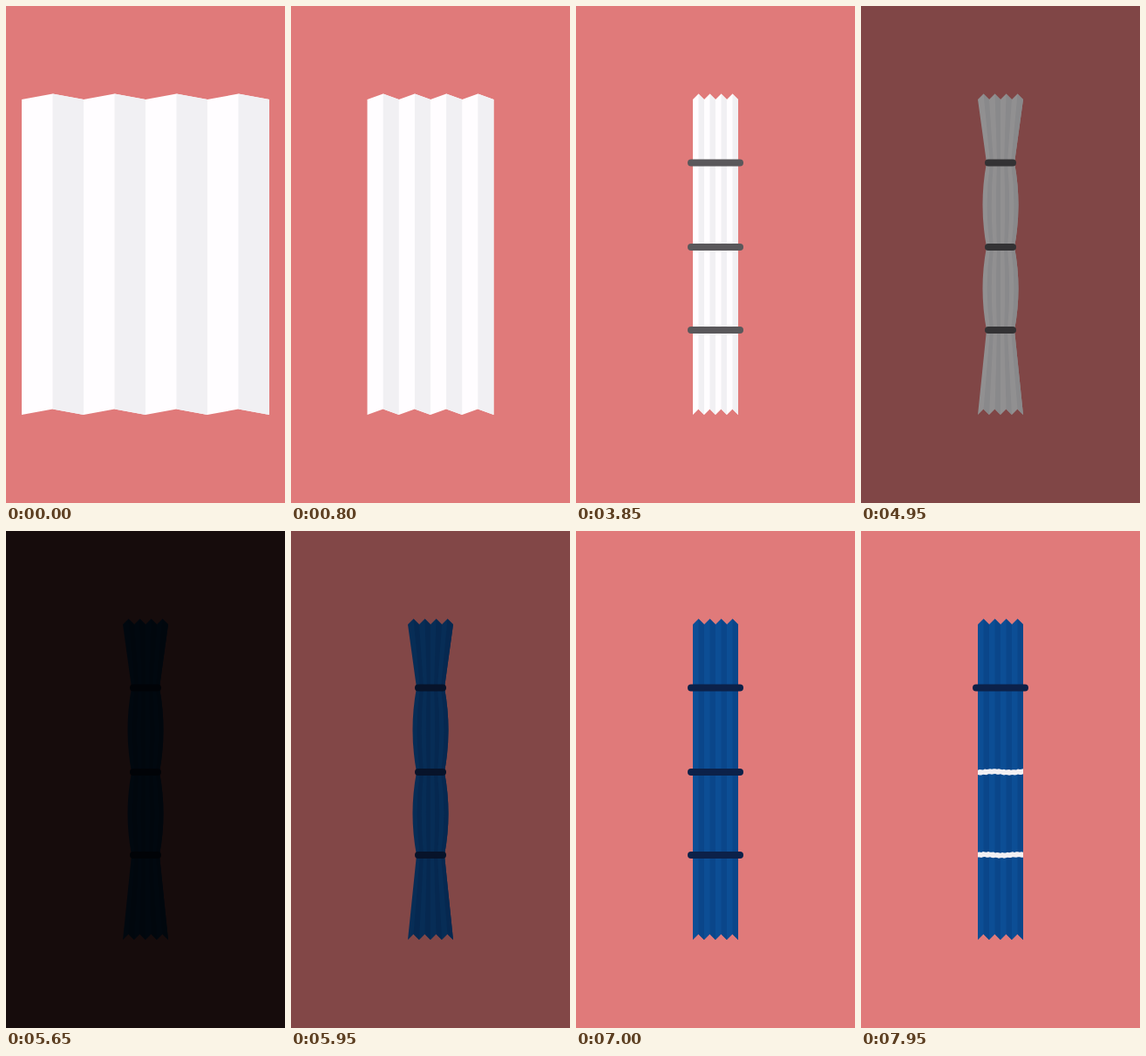
An HTML page that plays this animation: 320x569 px, repeating every 8000 ms.

```html
<!DOCTYPE html>
<html lang="en">
<head>
<meta charset="utf-8">
<title>Folded, tied and dyed cloth</title>
<style>
  html, body { margin: 0; width: 100%; height: 100%; overflow: hidden; background: #e07a7a; }
  svg { display: block; width: 100vw; height: 100vh; }
</style>
</head>
<body>
<svg id="stage" viewBox="0 0 320 569"></svg>
<script>
const LOOP = 8000;
const CX = 160, TOP = 107, BOTTOM = 468, FOLD = 6.5, PANELS = 8;
const TIES = [179.5, 276, 371];
const WHITE = { light: '#fffdff', shade: '#f1f0f3', band: '#5a585b' };
const BLUE = { light: '#0c4e95', shade: '#0a468a', band: '#0c2149' };

const stage = document.getElementById('stage');

function add(tag, attrs) {
  const el = document.createElementNS('http://www.w3.org/2000/svg', tag);
  set(el, attrs);
  stage.append(el);
  return el;
}
function set(el, attrs) {
  for (const key in attrs) el.setAttribute(key, attrs[key]);
}
const ramp = (t, a, b) => Math.min(1, Math.max(0, (t - a) / (b - a)));
const ease = p => p < 0.5 ? 2 * p * p : 1 - 2 * (1 - p) * (1 - p);
const move = (t, a, b) => ease(ramp(t, a, b));
const pt = (x, y) => x.toFixed(2) + ' ' + y.toFixed(2);

// Rough white line left where a tie kept the dye out
function resist(y, seed) {
  const upper = [], lower = [];
  for (let i = 0; i <= 26; i++) {
    const x = -26 + i * 2;
    const wave = 0.5 * Math.sin(i * 0.33 + seed);
    upper.push(pt(x, y - 3.1 + wave + 0.4 * Math.sin(i * 2.3 + seed)));
    lower.unshift(pt(x, y + 2.9 + wave + 0.4 * Math.sin(i * 1.9 + seed * 3)));
  }
  return 'M' + upper.concat(lower).join('L') + 'Z';
}

add('rect', { width: 320, height: 569, fill: '#e07a7a' });
const cloth = add('path', {});
const shades = add('path', {});
const marks = TIES.map((y, i) => add('path', { d: resist(y, i * 1.7), fill: '#f3f0f3' }));
const bands = TIES.map(y => add('rect', { y: y - 4, height: 8, rx: 4 }));
const dark = add('rect', { width: 320, height: 569, fill: '#000' });

// Outline of the panels between creases a and b
function ribbon(a, b, half, squeeze) {
  const tie = half - 10 * squeeze, bulge = half - squeeze;
  const x = (i, w) => CX + (i / PANELS * 2 - 1) * w;
  const lift = i => i % 2 ? FOLD : 0;
  const [y1, y2, y3] = TIES;
  const m1 = (y1 + y2) / 2, m2 = (y2 + y3) / 2;
  const top = [], bottom = [];
  for (let i = a; i <= b; i++) {
    top.push(pt(x(i, half), TOP - lift(i)));
    bottom.unshift(pt(x(i, half), BOTTOM - lift(i)));
  }
  const side = (i, ys) =>
    'L' + pt(x(i, tie), ys[0]) +
    'Q' + pt(x(i, bulge), ys[1]) + ' ' + pt(x(i, tie), ys[2]) +
    'Q' + pt(x(i, bulge), ys[3]) + ' ' + pt(x(i, tie), ys[4]);
  const ys = [y1, m1, y2, m2, y3];
  return 'M' + top.join('L') + side(b, ys) + 'L' + bottom.join('L') +
    side(a, ys.slice().reverse()) + 'Z';
}

function draw(t) {
  const dyed = t > 5450;
  const look = dyed ? BLUE : WHITE;
  const half = 142 - 116 * move(t, 0, 1450);
  const squeeze = move(t, 3880, 4550) - move(t, 6450, 6980);

  set(cloth, { d: ribbon(0, PANELS, half, squeeze), fill: look.light });
  let d = '';
  for (let i = 1; i < PANELS; i += 2) d += ribbon(i, i + 1, half, squeeze);
  set(shades, { d, fill: look.shade });

  const reach = 32 - 14 * squeeze;
  TIES.forEach((y, i) => {
    const start = 1720 + i * 760;
    const off = 7450 - (i - 1) * 0 - (i === 2 ? 430 : 0);
    const tied = move(t, start, start + 460);
    const freed = i ? move(t, off, off + 400) : 0;
    const width = 2 * reach * (tied - freed);
    set(bands[i], {
      x: CX - reach,
      width: Math.max(0, width),
      fill: look.band,
      visibility: width > 0.5 ? 'visible' : 'hidden'
    });
    set(marks[i], {
      transform: `translate(${CX} 0) scale(${1 - squeeze * 10 / 26} 1)`,
      visibility: dyed && freed > 0 ? 'visible' : 'hidden'
    });
  });

  dark.setAttribute('opacity', dyed ? 1 - ramp(t, 5590, 6215) : ramp(t, 4700, 5270) * 0.98);
}

function tick() {
  draw(performance.now() % LOOP);
  requestAnimationFrame(tick);
}
tick();
</script>
</body>
</html>
```
